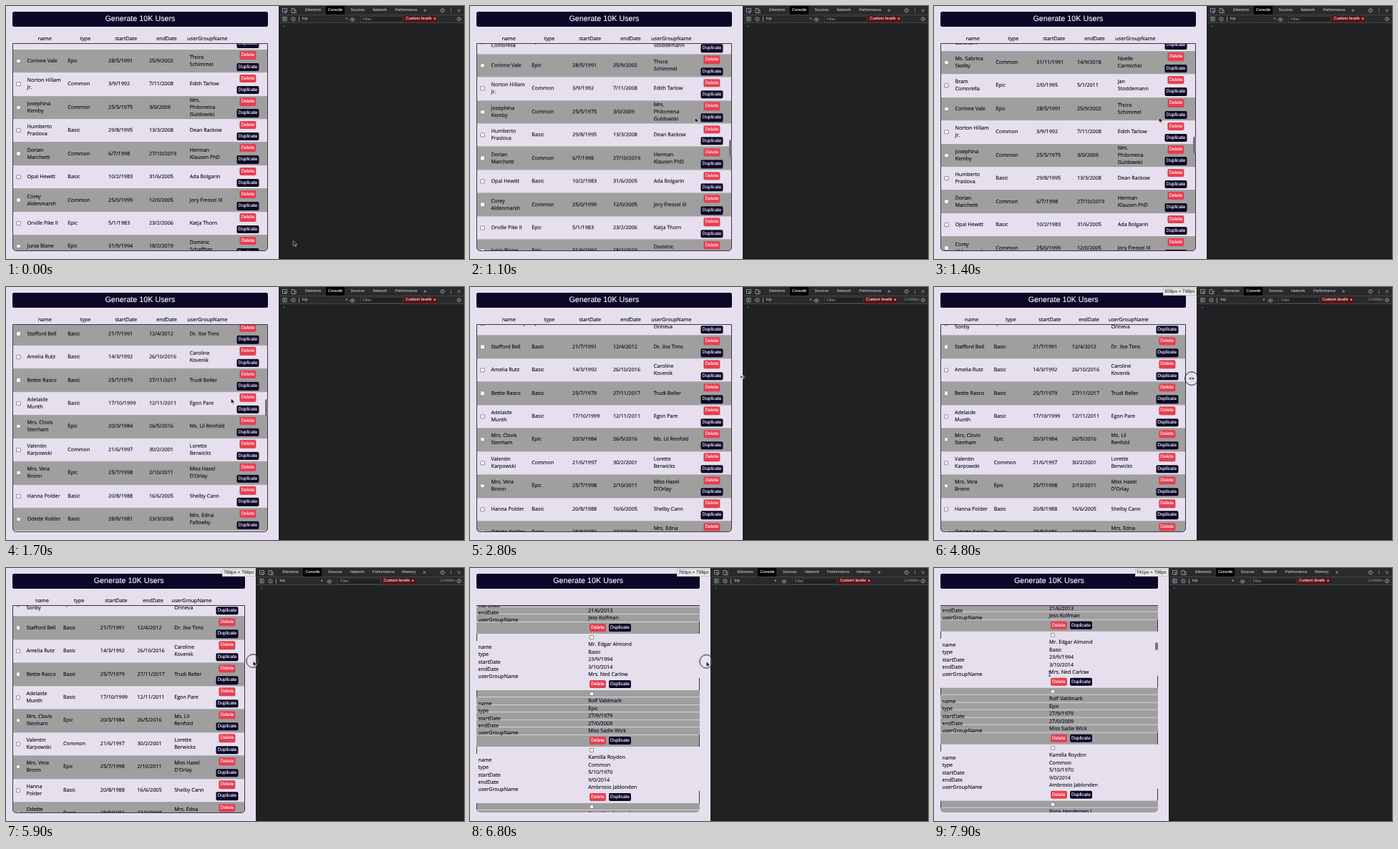
Recreate the animation shown at these times as an HTML page. Size 640 by 354 pixels, loop 8 s.

```html
<!DOCTYPE html>
<html lang="en">
<head>
<meta charset="utf-8">
<title>User table</title>
<style>
@property --w { syntax: "<length>"; inherits: true; initial-value: 381px; }
@property --px { syntax: "<integer>"; inherits: true; initial-value: 858; }
@property --levels { syntax: "<length>"; inherits: true; initial-value: 556px; }

html, body { margin: 0; width: 100%; height: 100%; overflow: hidden; }
html { animation: resize 8s linear infinite, levels 8s step-end infinite; }
body {
  --d: calc(381px - var(--w));
  --step: calc(56.8px - .162 * var(--d));
  position: relative; background: #e6e0ee; color: #05030c;
  font: 7.2px/10px "Open Sans", "Noto Sans", sans-serif;
  text-rendering: geometricPrecision;
  -webkit-text-stroke: .1px;
}
div, span, svg, i { position: absolute; box-sizing: border-box; }
span { white-space: nowrap; }

/* Page */
#generate {
  left: 9px; top: 8px; width: calc(var(--w) - 24px); height: 21px; border-radius: 2.5px;
  background: #0c0728; color: #fff; text-align: center;
  font: 10.75px/21px "Liberation Sans", Arial, sans-serif;
}
.view {
  left: 9px; top: 53px; width: calc(var(--w) - 24px); height: 289px;
  overflow: hidden; border-radius: 0 0 5px 5px;
}
.frame {
  left: 9px; top: 52px; width: calc(var(--w) - 24px); height: 291px;
  border: 1px solid #3a383e; border-radius: 0 0 5px 5px;
}
#table, #stack { left: 0; top: 0; width: 100%; height: 100%; }
#table { animation: table 8s step-end infinite; }
#stack { animation: stack 8s step-end infinite; }
#stack .frame { height: 1px; border-width: 1px 0 0; border-radius: 0; }

.head {
  top: 40.7px; width: var(--step); text-align: center;
  left: calc(25.8px - .035 * var(--d) + var(--i) * var(--step));
}
.rows { left: 0; top: 0; width: 100%; animation: scroll 8s linear infinite; }
.row { left: 0; width: 100%; height: 32.44px; }
.row:nth-child(even), .block:nth-child(odd) { background: #9f9f9f; }
.cell {
  display: flex; align-items: center; height: 100%;
  width: calc(50.3px - .17 * var(--d));
  left: calc(20.5px - .035 * var(--d) + var(--i) * var(--step));
}
.check { width: 6.2px; height: 6.2px; border: .6px solid #8c8c8c; border-radius: 1px; background: #fff; }
.row .check { left: calc(5.4px - .02 * var(--d)); top: 13px; }
.btn {
  height: 11.4px; border-radius: 2px; color: #fff; text-align: center;
  font: 6.45px/11.4px "Liberation Sans", Arial, sans-serif;
}
.del { width: 23.2px; background: #e63e50; }
.dup { width: 31px; background: #0c0728; }
.row .btn { left: calc(329px - .92 * var(--d)); transform: translateX(-50%); }
.row .del { top: 2.6px; }
.row .dup { top: 18.9px; }

.blocks { left: 0; top: 0; width: 100%; animation: nudge 8s linear infinite; }
.block { left: 0; width: 100%; height: 79px; }
.line { left: 0; width: 100%; height: 10.45px; }
.block:nth-child(odd) .line { border-bottom: .8px solid #d8d1e0; }
.line span { left: 2.5px; top: 3.2px; }
.line b { position: absolute; left: 50%; font-weight: 400; white-space: nowrap; }
.block .check { left: calc(50% + 1.6px); top: 1.8px; }
.block .btn { top: 64.6px; }
.block .del { left: calc(50% + 1.7px); }
.block .dup { left: calc(50% + 28.8px); }
.edge { width: 1px; background: #3a383e; }
.edge.l { left: 0; top: 0; height: 10px; }
.edge.r { right: 0; top: 62px; height: 17px; }

.thumb { width: 3.4px; border-radius: 2px; background: #777379; left: calc(var(--w) - 18.6px); }
#table .thumb { top: 183px; height: 24px; animation: thumb 8s linear infinite; }
#stack .thumb { top: 104px; height: 10.5px; animation: thumb2 8s step-end infinite; }

#tip {
  left: calc(var(--w) - 47.5px); top: 1px; width: 47px; height: 11px;
  background: #e9e9eb; border: .5px solid #c4c4c8; color: #333; text-align: center;
  font: 6.4px/10px "Liberation Sans", Arial, sans-serif; white-space: nowrap;
  animation: tip 8s step-end infinite;
}
#tip::after { counter-reset: px var(--px); content: counter(px) "px × 798px"; }

/* Inspector */
#dev {
  left: var(--w); top: 0; right: 0; bottom: 0; overflow: hidden;
  background: #202122; border-left: 1px solid #242526; color: #b8bbbf;
  font: 5.4px/12.4px "Liberation Sans", Arial, sans-serif;
}
.bar { left: 0; right: 0; background: #292a2b; border-bottom: .6px solid #434547; }
.tab { top: 0; transform: translateX(-50%); }
.on { padding: 0 3px; background: #000; color: #fff; }
#memory { animation: memory 8s step-end infinite; }
#more { left: 203.5px; font-size: 7.5px; animation: more 8s step-end infinite; }
.tool { top: 12.4px; }
#dev svg { fill: none; stroke: #a4a8ad; stroke-width: .8; overflow: visible; }
#pick { left: calc(92px - .1 * var(--d)); font-size: 4px; }
#filter, #custom { top: 13.8px; height: 9.6px; line-height: 9.4px; }
#filter {
  left: 113px; padding-left: 2.5px; background: #202122; border: .5px solid #3a3c40; color: #85898e;
  width: calc(var(--levels) - 115px - var(--w) - .82 * var(--d));
}
#custom {
  left: calc(var(--levels) - 1px - var(--w) - .82 * var(--d)); width: 46px;
  padding-left: 2.5px; background: #5b1416; color: #eee0e0; font-size: 5.75px;
}
#custom i { right: 1.5px; font: 3.5px/9.4px "DejaVu Sans", sans-serif; }
#hidden { right: 12.5px; color: #85898e; animation: hidden 8s step-end infinite; }
#prompt { left: 5.5px; top: 23px; color: #3b82f0; font-size: 7px; }
#base { left: 0; right: 0; bottom: 0; height: 1.2px; background: #2a1219; }

/* Pointer */
#mouse { left: 0; top: 0; animation: mouse 8s linear infinite; }
#mouse svg { left: 0; top: 0; width: 1px; height: 1px; overflow: visible; }
#arrow { animation: arrow 8s step-end infinite; }
#grip { animation: grip 8s step-end infinite; }
#beam { animation: beam 8s step-end infinite; }
#ring { animation: ring 8s step-end infinite; }

/* The divider picks up speed slowly, then follows the drag until it is released. */
@keyframes resize {
  0%, 42% { --w: 381px; --px: 858; }
  45% { --w: 380px; --px: 856; animation-timing-function: ease-in; }
  60% { --w: 367.5px; --px: 828; }
  67.5% { --w: 356px; --px: 803; }
  73.75% { --w: 349.5px; --px: 789; }
  78.75% { --w: 345px; --px: 778; }
  85% { --w: 336.5px; --px: 760; }
  90% { --w: 329.5px; --px: 744; }
  91.5%, 100% { --w: 328px; --px: 741; }
}
@keyframes levels { 0% { --levels: 556px; } 28%, 100% { --levels: 551px; } }
@keyframes scroll {
  0%, 12.5% { transform: translateY(-413.9px); animation-timing-function: ease-in; }
  17.5% { transform: translateY(-348px); animation-timing-function: cubic-bezier(.3, .4, .5, 1); }
  22.5%, 100% { transform: translateY(-17.7px); }
}
@keyframes nudge {
  0%, 96.5% { transform: translateY(-40px); }
  98.7%, 100% { transform: translateY(-43.3px); }
}
@keyframes thumb {
  0%, 12.4% { transform: translateY(5.5px); opacity: 0; }
  12.5% { transform: translateY(5.5px); opacity: 1; }
  17.5% { transform: none; animation-timing-function: cubic-bezier(.3, .4, .5, 1); }
  22.5%, 28% { transform: translateY(-27.5px); opacity: 1; }
  31%, 100% { transform: translateY(-27.5px); opacity: 0; }
}
@keyframes thumb2 { 0% { opacity: 0; } 96.5%, 100% { opacity: 1; } }
@keyframes table { 0% { opacity: 1; } 84.8%, 100% { opacity: 0; } }
@keyframes stack { 0% { opacity: 0; } 84.8%, 100% { opacity: 1; } }
@keyframes tip { 0% { opacity: 0; } 42.1%, 100% { opacity: 1; } }
@keyframes memory { 0% { opacity: 0; } 65.1%, 100% { opacity: 1; } }
@keyframes more { 0% { left: 203.5px; } 65.1%, 100% { left: 234px; } }
@keyframes hidden { 0% { opacity: 0; } 28%, 100% { opacity: 1; } }
@keyframes mouse {
  0% { transform: translate(401.5px, 328.5px); animation-timing-function: ease-in-out; }
  11%, 24% { transform: translate(314.5px, 156px); animation-timing-function: ease-in-out; }
  31.25%, 42% { transform: translate(381px, 126px); }
  45% { transform: translate(378px, 126.3px); animation-timing-function: ease-in; }
  60% { transform: translate(360px, 128px); }
  67.5% { transform: translate(350.5px, 129px); }
  73.75% { transform: translate(345.3px, 130px); }
  78.75% { transform: translate(340px, 130.3px); }
  85% { transform: translate(330.3px, 130.7px); }
  91% { transform: translate(322px, 131px); animation-timing-function: ease-in-out; }
  96%, 100% { transform: translate(161.5px, 148px); }
}
@keyframes arrow { 0% { opacity: 1; } 30.5% { opacity: 0; } 67% { opacity: 1; } 95.5%, 100% { opacity: 0; } }
@keyframes grip { 0% { opacity: 0; } 30.5% { opacity: 1; } 67%, 100% { opacity: 0; } }
@keyframes beam { 0% { opacity: 0; } 95.5%, 100% { opacity: 1; } }
@keyframes ring { 0% { opacity: 0; } 41% { opacity: 1; } 91.5%, 100% { opacity: 0; } }
</style>
</head>
<body>
<div id="generate">Generate 10K Users</div>

<div id="table">
  <div id="heads"></div>
  <div class="view"><div class="rows" id="rows"></div></div>
  <div class="frame"></div>
  <div class="thumb"></div>
</div>

<div id="stack">
  <div class="view"><div class="blocks" id="blocks"></div></div>
  <div class="frame"></div>
  <div class="thumb"></div>
</div>

<div id="dev">
  <div class="bar" style="top:0;height:12.6px"></div>
  <div class="bar" style="top:12.6px;height:11.6px"></div>
  <svg width="40" height="25" style="left:0;top:0">
    <path d="M9 9H4.500V3.500H10.500V6M7.500 6l4 1.500-1.700.6-.6 1.800z"/>
    <path d="M17 3.500h4v6h-4zM21 5.500h2.200v4H21"/>
    <path d="M4.800 15.500h5.400v5.400H4.800zM6.700 16.800l2 1.400-2 1.400z"/>
    <circle cx="19.500" cy="18.300" r="2.700"/><path d="M17.600 16.400l3.800 3.800M27.500 15v7" />
  </svg>
  <span class="tab" style="left:47.300px">Elements</span>
  <span class="tab on" style="left:78px">Console</span>
  <span class="tab" style="left:109.300px">Sources</span>
  <span class="tab" style="left:140.300px">Network</span>
  <span class="tab" style="left:177px">Performance</span>
  <span class="tab" id="memory" style="left:213px">Memory</span>
  <span class="tab" id="more">»</span>
  <svg width="40" height="25" style="right:0;top:0">
    <circle cx="10" cy="6.300" r="2"/><circle cx="10" cy="6.300" r="2.900" stroke-dasharray="1.140"/>
    <path d="M21.700 3.700v1.100m0 1v1.100m0 1v1.100" stroke-width="1.100"/>
    <path d="M31 4.200l4.200 4.200m0-4.200L31 8.400"/>
    <circle cx="33" cy="18.300" r="1.900"/><circle cx="33" cy="18.300" r="2.800" stroke-dasharray="1.100"/>
  </svg>
  <span class="tool" style="left:32px">top</span>
  <span class="tool" id="pick">▼</span>
  <svg width="8" height="6" style="left:97.500px;top:15.500px">
    <path d="M.5 3Q4-1.500 7.500 3 4 7.500 .5 3z"/><circle cx="4" cy="3" r="1"/>
  </svg>
  <span id="filter">Filter</span>
  <span id="custom">Custom levels<i>▼</i></span>
  <span class="tool" id="hidden">2 hidden</span>
  <span id="prompt">›</span>
  <div id="base"></div>
</div>

<div id="tip"></div>

<div id="mouse">
  <svg id="ring"><circle r="9.300" fill="#fff" fill-opacity=".1" stroke="#17151c"/></svg>
  <svg id="arrow"><path d="M0 0V7.200L1.700 5.600 2.800 8.200 4 7.700 2.900 5.200H5.200Z" fill="#000" stroke="#fff" stroke-width=".6"/></svg>
  <svg id="grip"><path d="M-3.800 0l2.300-2v1.200h3V-2l2.300 2-2.300 2V.8h-3V2zM-.5-2.300h1v4.600h-1z" fill="#000" stroke="#fff" stroke-width=".5"/></svg>
  <svg id="beam"><path d="M-1.500-3.500Q0-3.500 0-2.500V2.500Q0 3.500-1.500 3.500M1.500-3.500Q0-3.500 0-2.500M0 2.500Q0 3.500 1.500 3.500" fill="none" stroke="#111" stroke-width=".8"/></svg>
</div>

<script>
const fields = ["name", "type", "startDate", "endDate", "userGroupName"];

const tableUsers = `Clarisse Sonby|Epic|23/5/1987|2/9/2005|Elizabeth Orineva
Stafford Bell|Basic|21/7/1991|12/4/2012|Dr. Ilse Tims
Amelia Rutz|Basic|14/3/1992|26/10/2016|Caroline Kovenik
Bettie Rasco|Basic|25/7/1979|27/11/2017|Trudi Beller
Adelaide Munth|Basic|17/10/1999|12/11/2011|Egon Pare
Mrs. Clovis Stenham|Epic|20/3/1984|26/5/2016|Ms. Lil Renfold
Valentin Karpowski|Common|21/6/1997|30/2/2001|Lorette Berwicks
Mrs. Vera Bronn|Epic|25/7/1998|2/10/2011|Miss Hazel D'Orlay
Hanna Polder|Basic|20/8/1988|16/6/2005|Shelby Cann
Odette Kolder|Basic|28/8/1981|23/3/2008|Mrs. Edna Fallowby
Lavinia Bantham|Basic|4/2/1988|9/9/2009|Rufus Dane
Ms. Sabrina Skelby|Common|31/11/1991|14/9/2018|Noelle Carmichel
Bram Comorella|Epic|2/0/1995|5/1/2011|Jan Stoddemann
Corinne Vale|Epic|28/5/1991|25/9/2002|Thora Schimmel
Norton Hillam Jr.|Common|3/9/1992|7/11/2008|Edith Tarlow
Josephina Kemby|Common|25/5/1975|3/0/2009|Mrs. Philomena Guldowski
Humberto Praslova|Basic|29/8/1995|13/3/2008|Dean Rackow
Dorian Marchetti|Common|6/7/1998|27/10/2019|Herman Klausen PhD
Opal Hewitt|Basic|10/2/1983|31/6/2005|Ada Bolgarin
Corey Aldenmarsh|Common|25/0/1999|12/0/2005|Jory Fressel III
Orville Pike II|Epic|5/1/1983|23/2/2006|Katja Thorn
Junia Blane|Epic|31/9/1994|18/2/2019|Dominic Schaffner`;

const stackUsers = `Pia Lundmar|Basic|14/2/1986|21/6/2013|Jess Kolfman
Mr. Edgar Almond|Basic|23/9/1994|3/10/2014|Mrs. Ned Carlow
Rolf Valdmark|Epic|27/9/1979|27/0/2009|Miss Sadie Wick
Kamilla Roydon|Common|5/10/1970|9/0/2014|Ambrosio Jablonden
Ilona Hendersen I|Basic|8/4/1982|11/7/2010|Otto Frisk`;

const parse = text => text.split("\n").map(line => line.split("|"));
const buttons = '<div class="btn del">Delete</div><div class="btn dup">Duplicate</div>';
const check = '<div class="check"></div>';

heads.innerHTML = fields.map((f, i) => `<span class="head" style="--i:${i}">${f}</span>`).join("");

rows.innerHTML = parse(tableUsers).map((user, n) =>
  `<div class="row" style="top:${n * 32.44}px">${check}` +
  user.map((v, i) => `<div class="cell" style="--i:${i}">${v}</div>`).join("") +
  buttons + "</div>").join("");

blocks.innerHTML = parse(stackUsers).map((user, n) =>
  `<div class="block" style="top:${n * 79}px"><div class="line"></div>${check}` +
  user.map((v, i) =>
    `<div class="line" style="top:${(i + 1) * 10.45}px"><span>${fields[i]}</span><b>${v}</b></div>`).join("") +
  buttons + '<div class="edge l"></div><div class="edge r"></div></div>').join("");
</script>
</body>
</html>
```
